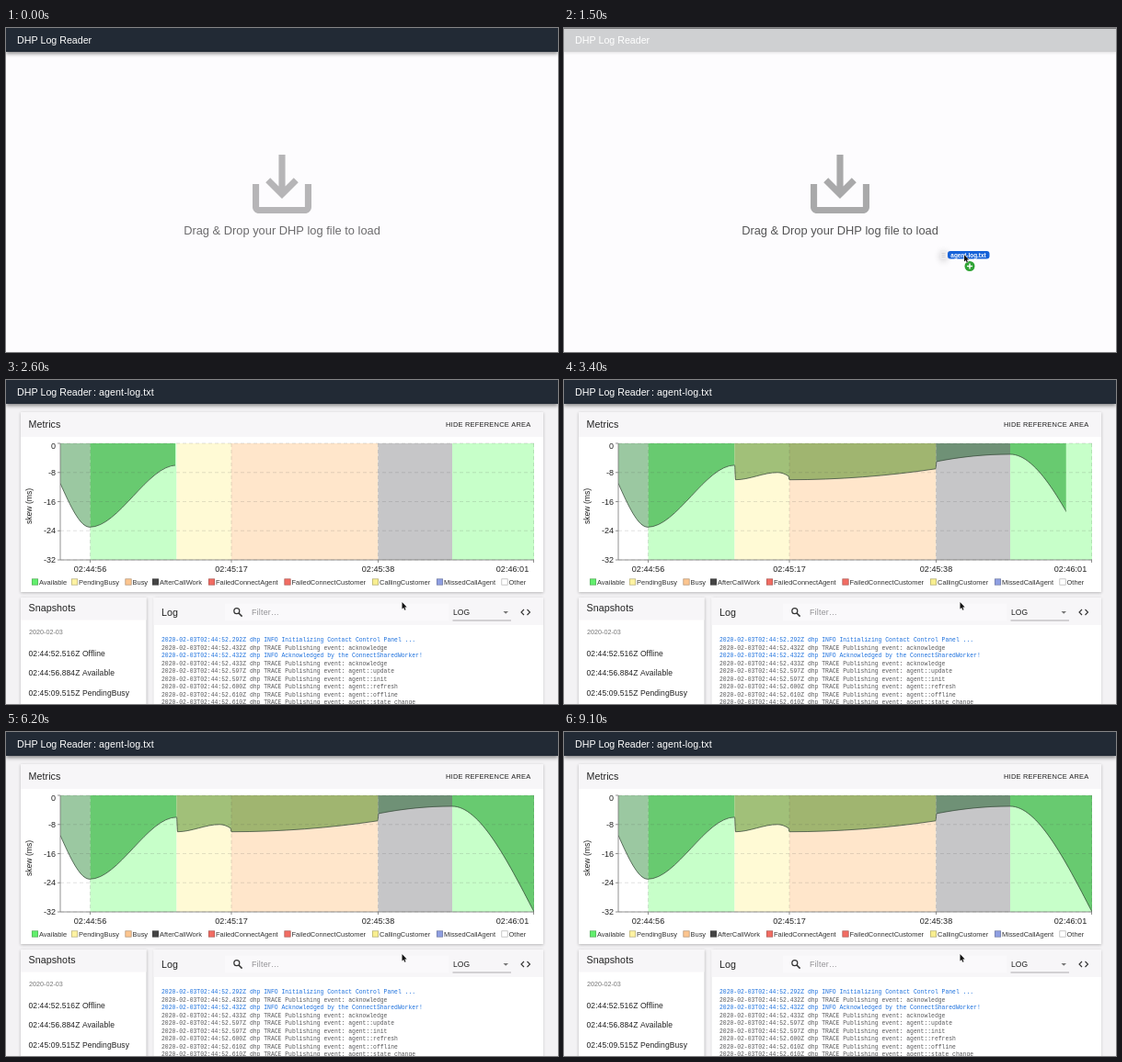
Write an HTML page with a canvas that moves like this. It is 600 px wide and 353 px high and loops after 9200 ms.

```html
<!DOCTYPE html>
<html lang="en">
<head>
<meta charset="utf-8">
<title>DHP Log Reader</title>
<style>
  html, body { margin: 0; width: 100%; height: 100%; overflow: hidden; background: #fdfcfe; }
  canvas { display: block; }
</style>
</head>
<body>
<canvas id="stage" width="600" height="353"></canvas>
<script>
const ctx = document.getElementById('stage').getContext('2d');
const LOOP = 9200, STEP = 100;
const DRAG_START = 100, DROP = 2000, LOADED = 2300, REVEAL_START = 2335, REVEAL_TIME = 1500;
const SANS = '"Liberation Sans", Arial, sans-serif';
const MONO = '"Liberation Mono", monospace';

const PLOT = { left: 59, right: 574, top: 69, bottom: 196 };
const valueY = v => PLOT.top - v * (PLOT.bottom - PLOT.top) / 32;

// Right edge, plain colour, colour under the skew area
const REGIONS = [
  [91.5, '#ffffff', '#9bc8a1'],
  [185.5, '#c7ffc9', '#68ca70'],
  [245, '#fffad5', '#a1c079'],
  [404.5, '#ffe6cb', '#a0b570'],
  [485, '#c6c6c8', '#6f9176'],
  [574, '#c7ffc9', '#68ca70']
];

const SKEW = [
  [59, -11], [91, -23], [185.5, -6], [186.5, -10], [232, -8], [244, -9],
  [245, -10], [404, -7], [405, -5], [485, -3], [574, -32]
].map(([x, v]) => [x, valueY(v)]);

const LEGEND = [
  [28, 'Available', '#62ef6c'], [71, 'PendingBusy', '#fff3a2'], [129.5, 'Busy', '#fcc58f'],
  [159, 'AfterCallWork', '#444444'], [220, 'FailedConnectAgent', '#f26c63'],
  [302.5, 'FailedConnectCustomer', '#f26c63'], [398, 'CallingCustomer', '#f9ef90'],
  [468, 'MissedCallAgent', '#8f9fe2'], [538.5, 'Other', '#ffffff']
];

const LOG = [
  ['292', 'INFO Initializing Contact Control Panel ...'],
  ['432', 'TRACE Publishing event: acknowledge'],
  ['432', 'INFO Acknowledged by the ConnectSharedWorker!'],
  ['433', 'TRACE Publishing event: acknowledge'],
  ['597', 'TRACE Publishing event: agent::update'],
  ['597', 'TRACE Publishing event: agent::init'],
  ['600', 'TRACE Publishing event: agent::refresh'],
  ['610', 'TRACE Publishing event: agent::offline'],
  ['610', 'TRACE Publishing event: agent::state_change']
];

// Time, x, y of the pointer while dragging
const DRAG_PATH = [
  [100, 625, 254], [1000, 532, 253], [1300, 462, 250], [1500, 435, 247], [1800, 430, 242]
];

const SAVE_ICON = new Path2D('M19 12v7H5v-7H3v7c0 1.1.9 2 2 2h14c1.1 0 2-.9 2-2v-7h-2zm-6 .67l2.59-2.58L17 11.5l-5 5-5-5 1.41-1.41L11 12.67V3h2z');
const SPIN_ICON = new Path2D('M12 6v3l4-4-4-4v3c-4.42 0-8 3.58-8 8 0 1.57.46 3.03 1.24 4.26L6.7 14.8c-.45-.83-.7-1.79-.7-2.8 0-3.31 2.69-6 6-6zm6.76 1.74L17.3 9.2c.44.84.7 1.79.7 2.8 0 3.31-2.69 6-6 6v-3l-4 4 4 4v-3c4.42 0 8-3.58 8-8 0-1.57-.46-3.03-1.24-4.26z');
const POINTER = new Path2D('M0 0V7.6L1.7 6L2.9 8.7L4 8.2L2.9 5.6H5.2Z');

function rect(x, y, w, h, color) {
  ctx.fillStyle = color;
  ctx.fillRect(x, y, w, h);
}

function text(str, x, y, size, color, { align = 'left', spacing = 0, font = SANS, bold = '' } = {}) {
  ctx.font = `${bold} ${size}px ${font}`;
  ctx.textAlign = align;
  ctx.letterSpacing = spacing + 'px';
  ctx.fillStyle = color;
  ctx.fillText(str, x, y);
}

function line(points, color, width = 1, dash = []) {
  ctx.beginPath();
  points.forEach(([x, y]) => ctx.lineTo(x, y));
  ctx.strokeStyle = color;
  ctx.lineWidth = width;
  ctx.setLineDash(dash);
  ctx.stroke();
  ctx.setLineDash([]);
}

function withShadow(blur, offset, alpha, draw) {
  ctx.save();
  ctx.shadowColor = `rgba(0,0,0,${alpha})`;
  ctx.shadowBlur = blur;
  ctx.shadowOffsetY = offset;
  draw();
  ctx.restore();
}

function icon(path, color, turn = 0) {
  ctx.save();
  ctx.translate(300, 170);
  ctx.rotate(turn);
  ctx.scale(3.556, 3.556);
  ctx.translate(-12, -12);
  ctx.fillStyle = color;
  ctx.fill(path);
  ctx.restore();
}

function pointer(x, y) {
  ctx.save();
  ctx.translate(x, y);
  ctx.strokeStyle = '#fff';
  ctx.lineWidth = 1;
  ctx.stroke(POINTER);
  ctx.fillStyle = '#111';
  ctx.fill(POINTER);
  ctx.restore();
}

function header(dragging, fileName) {
  if (dragging) {
    withShadow(3, 1, 0.12, () => rect(0, 0, 600, 26, '#cfd0d2'));
    rect(0, 0, 600, 1, '#77787a');
  } else {
    withShadow(4, 1.5, 0.45, () => rect(0, 0, 600, 26, '#222a35'));
  }
  text('DHP Log Reader', 12, 17, 10.67, '#fff');
  if (fileName) text(': ' + fileName, 95, 17, 10.67, '#fff', { spacing: 0.08 });
}

function dragPosition(t) {
  const next = DRAG_PATH.findIndex(p => p[0] > t);
  if (next < 0) return DRAG_PATH[DRAG_PATH.length - 1].slice(1);
  const [t0, x0, y0] = DRAG_PATH[next - 1], [t1, x1, y1] = DRAG_PATH[next];
  const k = (t - t0) / (t1 - t0);
  return [x0 + (x1 - x0) * k, y0 + (y1 - y0) * k];
}

function draggedFile(x, y) {
  withShadow(7, 2, 0.2, () => rect(x - 26, y - 5, 7, 9.5, '#eeeeef'));
  [-2, 0, 2].forEach(dy => rect(x - 24.5, y + dy, 4, 0.6, '#c4c4c6'));
  ctx.beginPath();
  ctx.roundRect(x - 18, y - 4, 45.5, 8.5, 3);
  ctx.fillStyle = '#1662d8';
  ctx.fill();
  text('agent-log.txt', x + 4.5, y + 2.5, 6.4, '#fff', { align: 'center', bold: 'bold' });
  ctx.beginPath();
  ctx.arc(x + 6, y + 12.5, 5.5, 0, 7);
  ctx.fillStyle = '#2fa334';
  ctx.fill();
  line([[x + 3, y + 12.5], [x + 9, y + 12.5]], '#fff', 1.4);
  line([[x + 6, y + 9.5], [x + 6, y + 15.5]], '#fff', 1.4);
  pointer(x, y);
}

function dropScreen(t) {
  const dragging = t >= DRAG_START;
  rect(0, 0, 600, 353, '#fdfcfe');
  header(dragging);
  icon(SAVE_ICON, dragging ? '#a9a9aa' : '#b6b5b7');
  text('Drag & Drop your DHP log file to load', 300, 225, 12.87, dragging ? '#545455' : '#6c6b6d', { align: 'center' });
  if (dragging) draggedFile(...dragPosition(t));
}

function loadingScreen(t) {
  rect(0, 0, 600, 353, '#fdfcfe');
  header(false, 'agent-log.txt');
  icon(SPIN_ICON, '#b6b5b7', (t - 1933) / 2000 * Math.PI * 2);
  text('Loading...', 300, 225, 12.87, '#6c6b6d', { align: 'center' });
  pointer(430.5, 242);
}

// Cubic-bezier(.25, .1, .25, 1)
function ease(p) {
  if (p <= 0) return 0;
  if (p >= 1) return 1;
  const bez = (a, b, s) => 3 * a * s * (1 - s) ** 2 + 3 * b * s * s * (1 - s) + s ** 3;
  let lo = 0, hi = 1;
  for (let i = 0; i < 30; i++) {
    const mid = (lo + hi) / 2;
    if (bez(0.25, 0.25, mid) < p) lo = mid; else hi = mid;
  }
  return bez(0.1, 1, lo);
}

// Monotone cubic through the points
function monotoneCurve(points) {
  const path = new Path2D();
  const last = points.length - 1;
  const slope = i => (points[i + 1][1] - points[i][1]) / (points[i + 1][0] - points[i][0]);
  const inner = i => {
    const a = slope(i - 1), b = slope(i);
    const ha = points[i][0] - points[i - 1][0], hb = points[i + 1][0] - points[i][0];
    const mean = (a * hb + b * ha) / (ha + hb);
    return (Math.sign(a) + Math.sign(b)) * Math.min(Math.abs(a), Math.abs(b), Math.abs(mean) / 2);
  };
  const tangent = i => i === 0 ? (3 * slope(0) - inner(1)) / 2
    : i === last ? (3 * slope(last - 1) - inner(last - 1)) / 2 : inner(i);
  path.moveTo(...points[0]);
  for (let i = 0; i < last; i++) {
    const [x0, y0] = points[i], [x1, y1] = points[i + 1], h = (x1 - x0) / 3;
    path.bezierCurveTo(x0 + h, y0 + h * tangent(i), x1 - h, y1 - h * tangent(i + 1), x1, y1);
  }
  return path;
}

const skewLine = monotoneCurve(SKEW);
const skewArea = new Path2D(skewLine);
skewArea.lineTo(PLOT.right, PLOT.top);
skewArea.lineTo(PLOT.left, PLOT.top);

function regions(shade) {
  let x = PLOT.left;
  REGIONS.forEach(region => {
    rect(x, PLOT.top, region[0] - x, PLOT.bottom - PLOT.top, region[shade]);
    x = region[0];
  });
}

function chart(t) {
  const { left, right, top, bottom } = PLOT;
  const shown = (right - left) * ease((t - REVEAL_START) / REVEAL_TIME);
  regions(1);
  ctx.save();
  ctx.beginPath();
  ctx.rect(left, top - 1, shown, bottom - top + 2);
  ctx.clip();
  ctx.save();
  ctx.clip(skewArea);
  regions(2);
  ctx.restore();
  ctx.strokeStyle = '#3f5142';
  ctx.lineWidth = 0.8;
  ctx.stroke(skewLine);
  ctx.restore();

  const grid = 'rgba(70,70,70,.2)', axis = '#777';
  const columns = [91.5, 245, 404.5, 573.5];
  columns.forEach(x => {
    line([[x, top], [x, bottom]], grid, 0.8, [4, 3]);
    line([[x, bottom], [x, bottom + 3]], axis, 0.8);
  });
  [0, -8, -16, -24, -32].forEach(v => {
    const y = valueY(v);
    line([[left, y], [right, y]], grid, 0.8, [4, 3]);
    line([[left - 3, y], [left, y]], axis, 0.8);
    text(String(v), 54, (v ? y : y + 3) + 3.2, 9, '#222', { align: 'right' });
  });
  line([[left, top], [left, bottom], [right, bottom]], axis, 0.8);
  ['02:44:56', '02:45:17', '02:45:38', '02:46:01'].forEach((label, i) =>
    text(label, i < 3 ? columns[i] : 550.5, 208.5, 9.1, '#222', { align: 'center' }));

  ctx.save();
  ctx.translate(27.5, 137.5);
  ctx.rotate(-Math.PI / 2);
  text('skew (ms)', 0, 0, 8.6, '#222', { align: 'center' });
  ctx.restore();

  LEGEND.forEach(([x, label, color]) => {
    rect(x, 216.5, 7, 7, color);
    ctx.strokeStyle = 'rgba(60,60,60,.4)';
    ctx.lineWidth = 0.7;
    ctx.strokeRect(x + 0.3, 216.8, 6.4, 6.4);
    text(label, x + 8, 222.8, 7.47, '#333');
  });
}

function card(x, y, w, h, headHeight) {
  withShadow(3, 1, 0.25, () => rect(x, y, w, h, '#fff'));
  rect(x, y, w, headHeight, '#f7f6f8');
}

function snapshots() {
  card(16, 237, 136.5, 130, 24.5);
  text('Snapshots', 24.5, 252, 10.67, '#222', { spacing: 0.08 });
  text('2020-02-03', 25, 276.5, 7.2, '#777');
  ['02:44:52.516Z Offline', '02:44:56.884Z Available', '02:45:09.515Z PendingBusy'].forEach((row, i) =>
    text(row, 24.5, 300.7 + i * 21.4, 8.53, '#222', { spacing: 0.08 }));
}

function logPanel() {
  card(160.5, 237, 423.5, 130, 30);
  text('Log', 169, 256.5, 10.67, '#222', { spacing: 0.08 });
  rect(238, 243.5, 243, 19, '#faf9fb');
  ctx.beginPath();
  ctx.arc(250.8, 251.7, 3, 0, 7);
  ctx.strokeStyle = '#333';
  ctx.lineWidth = 1.2;
  ctx.stroke();
  line([[253, 254], [256.6, 257.6]], '#333', 1.5);
  text('Filter…', 267, 256, 8.9, '#949396', { spacing: 0.2 });
  text('LOG', 486, 256, 8.53, '#222', { spacing: 0.08 });
  line([[485.5, 262], [549, 262]], '#8d8c8e', 0.7);
  ctx.beginPath();
  ctx.moveTo(540.5, 252);
  ctx.lineTo(546, 252);
  ctx.lineTo(543.2, 254.8);
  ctx.fillStyle = '#757575';
  ctx.fill();
  line([[563, 250], [560, 253], [563, 256]], '#333', 1.1);
  line([[566.5, 250], [569.5, 253], [566.5, 256]], '#333', 1.1);
  LOG.forEach(([ms, message], i) =>
    text(`2020-02-03T02:44:52.${ms}Z dhp ${message}`, 169, 285 + i * 8.53, 6.4,
      message.startsWith('INFO') ? '#1a6fdd' : '#58585a', { font: MONO }));
}

function dashboard(t) {
  rect(0, 0, 600, 353, '#f3f2f4');
  header(false, 'agent-log.txt');
  card(16, 35, 568, 196, 27);
  text('Metrics', 24.5, 52, 10.67, '#222', { spacing: 0.08 });
  text('HIDE REFERENCE AREA', 478, 51.3, 7.47, '#222', { spacing: 0.21 });
  chart(t);
  snapshots();
  logPanel();
  pointer(430.5, 242);
}

function frame(now) {
  const t = Math.floor(now % LOOP / STEP) * STEP;
  if (t < DROP) dropScreen(t);
  else if (t < LOADED) loadingScreen(t);
  else dashboard(t);
  requestAnimationFrame(frame);
}

const start = performance.now();
const tick = () => {
  frame.offset = start;
};
tick();
frame(0);
</script>
</body>
</html>
```
